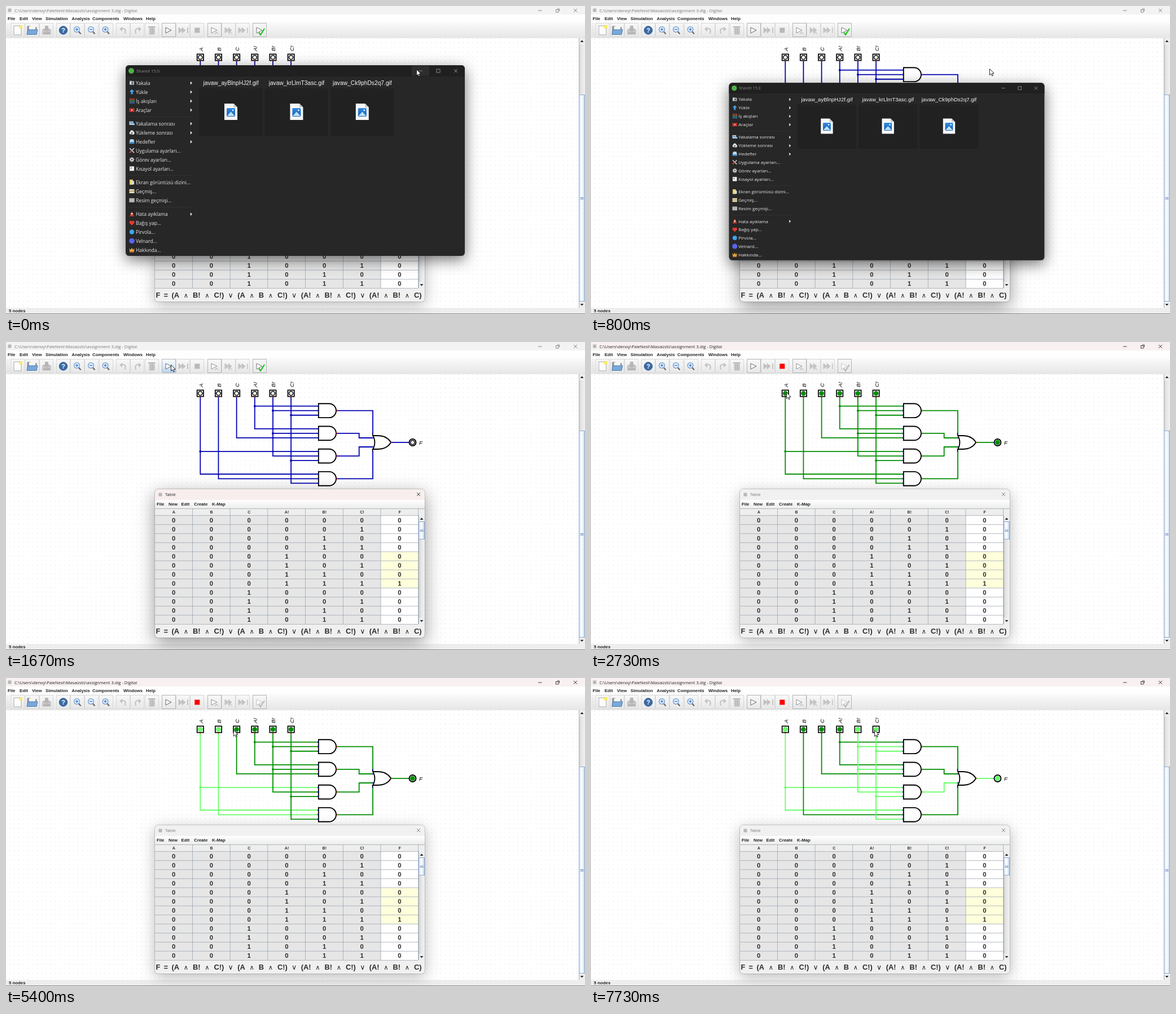
An HTML page with a canvas that plays this animation: 1026x546 px, repeating every 8 s.

```html
<!DOCTYPE html>
<html lang="en">
<head>
<meta charset="utf-8">
<title>Circuit simulation</title>
<style>
html, body { margin: 0; width: 100%; height: 100%; overflow: hidden; background: #fff; }
canvas { display: block; width: 1026px; height: 546px; }
</style>
</head>
<body>
<canvas id="stage" width="1026" height="546"></canvas>
<script>
const c = document.getElementById('stage').getContext('2d');
const LOOP = 8000, TICK = 1000 / 15, U = 8.04;
const UI = '"Open Sans", "Noto Sans", sans-serif';
const ARIAL = '"Liberation Sans", Arial, sans-serif';
const BOLD = 'bold 7.8px ' + ARIAL;
const HIGH = '#66ff66', LOW = '#008e00', WIRE = '#0000b2';
const NAMES = ['A', 'B', 'C', 'A!', 'B!', 'C!'];

// ---- drawing helpers ----
function box(x, y, w, h, fill) { c.fillStyle = fill; c.fillRect(x, y, w, h); }
function frame(x, y, w, h, color) {
  c.strokeStyle = color; c.lineWidth = 1; c.strokeRect(x + .5, y + .5, w - 1, h - 1);
}
function round(x, y, w, h, r, fill) {
  c.beginPath(); c.roundRect(x, y, w, h, r); c.fillStyle = fill; c.fill();
}
function line(pts, color, width = 1) {
  c.beginPath();
  for (let i = 0; i < pts.length; i += 2) c.lineTo(pts[i], pts[i + 1]);
  c.strokeStyle = color; c.lineWidth = width; c.stroke();
}
function poly(pts, fill, stroke, width = 1) {
  c.beginPath();
  for (let i = 0; i < pts.length; i += 2) c.lineTo(pts[i], pts[i + 1]);
  c.closePath();
  if (fill) { c.fillStyle = fill; c.fill(); }
  if (stroke) { c.strokeStyle = stroke; c.lineWidth = width; c.stroke(); }
}
function disc(x, y, r, fill, stroke, width = 1) {
  c.beginPath(); c.arc(x, y, r, 0, 7);
  if (fill) { c.fillStyle = fill; c.fill(); }
  if (stroke) { c.strokeStyle = stroke; c.lineWidth = width; c.stroke(); }
}
function text(s, x, y, font, color = '#222', align = 'left') {
  c.font = font; c.fillStyle = color; c.textAlign = align; c.fillText(s, x, y);
}
function cross(x, y, r, color) {
  line([x - r, y - r, x + r, y + r], color, .9);
  line([x - r, y + r, x + r, y - r], color, .9);
}
function fade(x0, y0, x1, y1, ...colors) {
  const g = c.createLinearGradient(x0, y0, x1, y1);
  colors.forEach((k, i) => g.addColorStop(i / (colors.length - 1), k));
  return g;
}
function shadowed(blur, dy, color, draw) {
  c.save();
  c.shadowBlur = blur; c.shadowOffsetY = dy; c.shadowColor = color;
  draw();
  c.restore();
}

// ---- timeline: time, x, y ----
const PATH = [
  [0, 727, 112], [199, 727, 112], [200, 729, 113], [600, 729, 113], [733, 720, 112], [800, 706, 111],
  [1000, 600, 86], [1200, 430, 50], [1333, 335, 32], [1467, 290, 37], [1667, 292, 40],
  [2133, 292, 40], [2333, 314, 64], [2533, 359, 86], [2733, 346, 89], [3067, 346, 89],
  [3400, 378, 91], [3533, 378, 91], [3867, 414, 93], [4000, 434, 94], [4133, 427, 94],
  [4267, 414, 93], [4400, 411, 92], [5267, 411, 92], [5800, 378, 91], [6133, 378, 91],
  [6467, 392, 93], [6733, 430, 96], [7000, 466, 92], [7133, 471, 92], [7467, 502, 92], [8000, 502, 92]
];
function pointer(t) {
  let i = 1;
  while (i < PATH.length - 1 && PATH[i][0] < t) i++;
  const [t0, x0, y0] = PATH[i - 1], [t1, x1, y1] = PATH[i];
  const k = Math.min(1, (t - t0) / (t1 - t0));
  return [x0 + (x1 - x0) * k, y0 + (y1 - y0) * k];
}
function inputs(t) {
  const on = (a, b = LOOP) => t >= a && t < b;
  return [on(3060), on(3520, 5990), on(4590, 5260), false, on(7120), on(7660)];
}

// ---- main window ----
function appIcon(x, y) { box(x - 3, y - 3, 6, 6, '#b4bab4'); }

function button(x, enabled, hover) {
  box(x, 30, 25, 25, hover ? fade(0, 30, 0, 55, '#ffffff', '#dcebf9', '#b4d2ee')
    : fade(0, 30, 0, 55, '#f8f8f8', '#f0f0f0', '#e6e6e6'));
  frame(x, 30, 25, 25, enabled ? '#b0b6bc' : '#d8d8d8');
}
function lens(x, sign) {
  line([x + 3, 45, x + 7, 49.5], '#666', 2.2);
  disc(x, 41.5, 4.9, '#e4effb', '#6c9bd0', 1.3);
  line([x - 2.4, 41.5, x + 2.4, 41.5], '#3b74b8', 1.3);
  if (sign) line([x, 39.1, x, 43.9], '#3b74b8', 1.3);
}
function play(x, color, n = 1) {
  for (let i = 0; i < n; i++) {
    const l = x - 5 + i * 6;
    poly([l, 38, l, 48, l + (n > 1 ? 6 : 10), 43], n > 1 ? color : '#fff', color, 1);
  }
}
function curl(x, dir) {
  c.beginPath();
  c.moveTo(x - 5 * dir, 41);
  c.quadraticCurveTo(x + 6 * dir, 37, x + 3 * dir, 49);
  c.strokeStyle = '#c4c4c4'; c.lineWidth = 2.2; c.stroke();
  poly([x - 7 * dir, 41, x - 2 * dir, 36.5, x - 2 * dir, 45.5], '#c4c4c4');
}
function toolbar(sim, hover) {
  box(0, 28, 1026, 29, fade(0, 28, 0, 57, '#fcfcfc', '#f0f0f0', '#e6e6e6'));
  for (let y = 31; y < 55; y += 3) for (let x = 2; x < 7; x += 3) box(x, y, 1, 1, '#c4c4c4');
  [276, 357, 437].forEach(x => button(x, true, hover && x === 276));
  [8, 34, 59, 89, 114, 139, 165, 195, 220, 246, 301, 326, 382, 407].forEach(x => button(x, false));

  poly([14, 35, 27, 35, 27, 51, 14, 51], '#fcfcfc', '#aaa');
  disc(26, 37, 3, '#f7e23c'); disc(26, 37, 1.5, '#fff9b0');
  poly([38, 36, 44, 36, 46, 38, 54, 38, 54, 50, 38, 50], '#a0a0a0', '#808080');
  poly([41, 36, 52, 36, 52, 43, 41, 43], '#f6f6f6');
  poly([39, 42, 56, 42, 54, 50.5, 37, 50.5], '#7aa8d8', '#4a7db8');
  round(64, 41, 16, 10, 2, '#c6c6c6');
  poly([69, 35, 75, 35, 75, 40, 78, 40, 72, 46, 66, 40, 69, 40], '#b6b6b6');
  box(66, 47, 12, 2, '#adadad');

  disc(101.5, 43, 7.2, '#3a6ca6', '#2b5488');
  text('?', 101.5, 47, 'bold 11px ' + ARIAL, '#fff', 'center');
  lens(125.5, true); lens(150.5, false); lens(176, true);
  curl(208, 1); curl(233, -1);
  round(253.5, 38, 10, 13, 1.5, '#c8c8c8');
  box(252, 36, 13, 2, '#b8b8b8');
  for (let x = 256; x < 263; x += 3) box(x, 40, 1, 9, '#b0b0b0');

  play(288, '#666');
  play(311, '#c2c2c2', 2); box(321, 38, 2, 10, '#c2c2c2');
  box(334.3, 38.5, 9, 9, sim ? '#ff0000' : '#b8b8b8');
  play(369, '#909090'); line([370, 50, 373, 46, 376, 50], '#aaa', 1);
  play(393, '#c4c4c4', 2); line([395, 50, 398, 46, 401, 50], '#bbb', 1);
  play(417, '#c4c4c4', 2); box(427, 38, 1.5, 10, '#c4c4c4');
  play(449, sim ? '#c0c0c0' : '#777');
  line([448, 47, 451, 51, 458, 40], sim ? '#bababa' : '#19c519', 2.2);
}
function arrow(x, y, dir) {
  poly([x - 3, y + 1.6 * dir, x + 3, y + 1.6 * dir, x, y - 1.8 * dir], '#222');
}
function scrollbar(x, y, h, top, size) {
  box(x, y, 11, h, '#eeeeee');
  box(x, y + 11, 11, h - 22, fade(x, 0, x + 11, 0, '#d2d2d2', '#e8e8e8', '#f0f0f0'));
  box(x, y, 1, h, '#a4aeb8');
  arrow(x + 5.5, y + 5.3, 1);
  arrow(x + 5.5, y + h - 5.5, -1);
  box(x, top, 11, size, fade(x, 0, x + 11, 0, '#cfe0f1', '#ffffff', '#b8cfe5'));
  frame(x, top, 11, size, '#8ea9cf');
  for (let i = -1; i < 2; i++) box(x + 2.5, top + size / 2 + i * 1.5, 6, .7, '#6382bf');
}
function mainWindow(active, sim, hover) {
  const ink = active ? '#222' : '#777';
  box(0, 0, 1026, 546, '#fff');
  box(0, 0, 1026, 15, active ? '#f8f0f1' : '#f3f3f3');
  appIcon(6.5, 7.5);
  text('C:\\Users\\denoy\\PaleNest\\Masaüstü\\assignment 3.dig - Digital', 15, 10.7, '7.6px ' + UI, ink);
  line([943, 8, 949.5, 8], ink, .9);
  c.strokeStyle = ink; c.lineWidth = .8;
  c.strokeRect(974.5, 6.5, 4.5, 4.5);
  line([976.5, 5, 980.5, 5, 980.5, 9], ink, .8);
  cross(1009, 7.8, 3, ink);

  box(0, 15, 1026, 13, '#fefefe');
  const menu = { File: 3, Edit: 24, View: 46, Simulation: 70, Analysis: 116.5, Components: 153, Windows: 208, Help: 248 };
  for (const s in menu) text(s, menu[s], 24.8, BOLD);
  toolbar(sim, hover);

  for (let y = 121.7 - 8 * U; y < 535; y += U)
    for (let x = 344.3 - 42 * U; x < 1014; x += U) box(x - .4, y - .4, .8, .8, '#c0c0c0');

  scrollbar(1015, 57, 478, 157, 367);
  box(0, 535, 1026, 11, '#eeeeee');
  text('5 nodes', 5, 543, BOLD);
  box(0, 545, 1026, 1, '#8a8a8a');
}

// ---- circuit ----
const colX = i => 344.3 + i * 4 * U;
const gateY = i => 121.7 + i * 5 * U;
const GATES = [[3, 4, 5], [3, 4, 2], [0, 4, 5], [0, 1, 5]];
const JOINTS = [[3, 0, 0], [4, 0, 1], [5, 0, 2], [4, 1, 1], [0, 2, 0], [5, 2, 2]];
const pinY = (g, p) => gateY(g) + (p - 1) * U;

function circuit(state, sim) {
  const col = on => sim ? (on ? HIGH : LOW) : WIRE;
  const outs = GATES.map(g => g.every(i => state[i]));
  const result = outs.some(Boolean);
  const W = 1.8;

  NAMES.forEach((name, i) => {
    let end = 97;
    GATES.forEach((g, k) => g.forEach((src, p) => {
      if (src !== i) return;
      const y = pinY(k, p);
      line([colX(i), y, 553, y], col(state[i]), W);
      end = Math.max(end, y);
    }));
    line([colX(i), 97, colX(i), end + W / 2], col(state[i]), W);
  });
  JOINTS.forEach(([i, g, p]) => disc(colX(i), pinY(g, p), 2, col(state[i])));

  line([586, gateY(0), 650, gateY(0), 650, 162], col(outs[0]), W);
  line([586, gateY(1), 625.7, gateY(1), 625.7, 170, 650, 170], col(outs[1]), W);
  line([586, gateY(2), 625.7, gateY(2), 625.7, 186, 650, 186], col(outs[2]), W);
  line([586, gateY(3), 650, gateY(3), 650, 194], col(outs[3]), W);
  line([682, 178, 714, 178], col(result), W);

  NAMES.forEach((name, i) => {
    const x = colX(i);
    box(x - 6.5, 84.5, 13, 13, '#000');
    box(x - 4.8, 86.2, 9.6, 9.6, '#fff');
    if (sim) disc(x, 91, 4.3, col(state[i]));
    else disc(x, 91, 3.6, '#fff', '#000', 1.5);
    disc(x, 97.6, .9, '#c00000');
    c.save();
    c.translate(x + 4.4, 80);
    c.rotate(-Math.PI / 2);
    text(name, 0, 0, 'italic 9.8px ' + ARIAL, '#000');
    c.restore();
  });

  GATES.forEach((g, k) => {
    const y = gateY(k);
    c.beginPath();
    c.moveTo(553.8, y - 12.4);
    c.lineTo(572.6, y - 12.4);
    c.arc(572.6, y, 12.4, -Math.PI / 2, Math.PI / 2);
    c.lineTo(553.8, y + 12.4);
    c.closePath();
    c.fillStyle = '#fff'; c.fill();
    c.strokeStyle = '#000'; c.lineWidth = 1.9; c.stroke();
    for (let p = 0; p < 3; p++) disc(553, pinY(k, p), 1.1, '#0000c0');
    disc(586, y, 1.1, '#c00000');
  });

  c.beginPath();
  c.moveTo(650, 166);
  c.lineTo(658, 166);
  c.bezierCurveTo(670, 166, 678, 171, 682, 178);
  c.bezierCurveTo(678, 185, 670, 190, 658, 190);
  c.lineTo(650, 190);
  c.bezierCurveTo(654.5, 183, 654.5, 173, 650, 166);
  c.fillStyle = '#fff'; c.fill();
  c.strokeStyle = '#000'; c.lineWidth = 1.9; c.stroke();
  line([649.6, 162.5, 650, 166], '#000', 1.9);
  line([650, 190, 649.6, 193.5], '#000', 1.9);
  [162, 170, 186, 194].forEach(y => disc(649.8, y, 1.1, '#0000c0'));
  disc(682.5, 178, 1.1, '#c00000');

  disc(720.5, 178, 6, '#fff', '#000', 1.9);
  if (sim) disc(720.5, 178, 4.4, col(result));
  else disc(720.5, 178, 3.6, '#fff', '#000', 1.5);
  disc(714.4, 178, 1, '#0000c0');
  text('F', 732, 181.5, 'italic 9.8px ' + ARIAL, '#000');
}

// ---- truth table ----
const FORMULA = 'F = (A ∧ B! ∧ C!) ∨ (A ∧ B ∧ C!) ∨ (A! ∧ B! ∧ C!) ∨ (A! ∧ B! ∧ C)';

function table(active) {
  const L = 264, T = 261, W = 478, H = 263, cw = 66.72;
  shadowed(active ? 32 : 26, active ? 9 : 6, active ? 'rgba(0,0,0,.42)' : 'rgba(0,0,0,.28)',
    () => round(L, T, W, H, 6, '#f0f0f0'));
  c.save();
  c.beginPath(); c.roundRect(L, T, W, H, 6); c.clip();
  box(L, T, W, 19, active ? '#f9eeee' : '#f1f1f1');
  appIcon(273.5, 270.5);
  text('Table', 282, 273.3, '7.6px ' + UI, active ? '#222' : '#777');
  cross(731, 270, 3, active ? '#222' : '#777');
  box(L, 280, W, 15, fade(0, 280, 0, 295, '#ffffff', '#ececec'));
  const menu = { File: 267, New: 288, Edit: 310.5, Create: 333, 'K-Map': 365 };
  for (const s in menu) text(s, menu[s], 289.8, BOLD);

  box(L, 295, W, 13, '#eeeeee');
  box(L, 308, cw * 6, 192, '#e6e6e6');
  box(L + cw * 6, 308, cw, 192, '#fff');
  box(L + cw * 6, 372, cw, 64, '#ffffdc');
  const rule = '#98a3ae', thin = .75;
  box(L, 295, W, thin, rule);
  for (let r = 0; r < 13; r++) box(L, 307.3 + r * 16.05, 467, thin, rule);
  for (let k = 1; k < 8; k++) box(L + k * cw - .7, 295, thin, 205, rule);
  [...NAMES, 'F'].forEach((s, k) => text(s, L + (k + .5) * cw, 304.4, 'bold 7.2px ' + ARIAL, '#333', 'center'));
  for (let r = 0; r < 12; r++)
    for (let k = 0; k < 7; k++) {
      const bit = k < 6 ? r >> (5 - k) & 1 : +(r === 7);
      text(bit, L + (k + .5) * cw - .2, 320 + r * 16.03, 'bold 11.3px ' + ARIAL, '#2a2a2a', 'center');
    }
  scrollbar(731, 308, 192, 318, 32);

  let x = 265.5;
  for (const s of FORMULA.split(' ')) {
    if (s === '∧' || s === '∨') {
      text(s, x + 5.7, 517, (s === '∨' ? 12.5 : 11.3) + 'px "DejaVu Sans", sans-serif', '#222', 'center');
      x += 11.4;
    } else {
      text(s, x, 517, 'bold 12.8px ' + ARIAL, '#2a2a2a');
      x += c.measureText(s).width;
    }
    x += 6.3;
  }
  c.restore();
  c.beginPath(); c.roundRect(L - .5, T - .5, W + 1, H + 1, 6);
  c.strokeStyle = 'rgba(110,110,110,.4)'; c.lineWidth = .8; c.stroke();
}

// ---- capture tool window ----
const ITEMS = [
  ['Yakala', 'camera', 1], ['Yükle', 'up', 1], ['İş akışları', 'grid', 1], ['Araçlar', 'case', 1], null,
  ['Yakalama sonrası', 'image', 1], ['Yükleme sonrası', 'cloud', 1], ['Hedefler', 'drive', 1],
  ['Uygulama ayarları...', 'tools'], ['Görev ayarları...', 'gear'], ['Kısayol ayarları...', 'key'], null,
  ['Ekran görüntüsü dizini...', 'folder'], ['Geçmiş...', 'card'], ['Resim geçmişi...', 'list'], null,
  ['Hata ayıklama', 'cone', 1], ['Bağış yap...', 'heart'], ['Pirvola...', 'blue'],
  ['Velnard...', 'violet'], ['Hakkında...', 'crown']
];
const ICONS = {
  camera() { box(-4, -2.5, 8, 6, '#c9d2d8'); box(-4, -3.5, 4, 1, '#9aa'); disc(1, .5, 2, '#53636e'); },
  up() { poly([0, -4.5, 4.3, 0, 1.5, 0, 1.5, 4.5, -1.5, 4.5, -1.5, 0, -4.3, 0], '#4aa3ec'); },
  grid() {
    ['#e64a3c', '#49b35a', '#3d86e0'].forEach((k, r) => {
      for (let i = 0; i < 3; i++) box(-4 + i * 3.2, -4 + r * 3.2, 2.2, 2.2, k);
    });
  },
  case() { box(-4.5, -2.5, 9, 6, '#d8392f'); box(-4.5, 0, 9, 1, '#8e1f19'); box(-1, -.5, 2, 2, '#eee'); },
  image() { box(-4.5, -3.5, 7, 6, '#dfe8ef'); box(-3.5, -2.5, 5, 3, '#5c9bd5'); box(1, 0, 4, 3, '#8fc1ee'); },
  cloud() { disc(-2, 1, 2.4, '#dde3e8'); disc(1.8, 1, 2.8, '#dde3e8'); disc(0, -1.2, 2.8, '#dde3e8'); poly([0, -1, 2, 2, -2, 2], '#555'); },
  drive() { poly([-3, -4, 3, -4, 4.5, 1, -4.5, 1], '#bcd8ee'); box(-4.5, 1, 9, 3, '#4a90cc'); },
  tools() { line([-4, -4, 4, 4], '#c5cbd0', 1.7); line([4, -4, 0, 0], '#c5cbd0', 1.7); line([0, 0, -4, 4], '#d84a3c', 1.9); },
  gear() {
    for (let i = 0; i < 4; i++) {
      const a = i * Math.PI / 4, x = 4.3 * Math.cos(a), y = 4.3 * Math.sin(a);
      line([-x, -y, x, y], '#d4d8da', 1.6);
    }
    disc(0, 0, 2.8, '#d4d8da'); disc(0, 0, 1.2, '#444');
  },
  key() { box(-4, -4, 8, 8, '#f0f0f0'); box(-2.5, -2.5, 2, 3, '#888'); },
  folder() { box(-4, -4.5, 6, 9, '#f0cf6b'); box(-.5, -2, 4.5, 6, '#d5dde2'); },
  card() { box(-4.5, -3.5, 9, 7, '#eadfb8'); box(-4.5, -1, 9, 1.4, '#a07f45'); box(-3.5, -3, 4, 1, '#fff'); },
  list() {
    box(-4.5, -3.5, 9, 7, '#e2e2e2');
    for (let i = 0; i < 6; i++) box(-3.6 + i % 3 * 2.7, -2.5 + (i > 2) * 3, 1.8, 1.8, '#777');
  },
  cone() { poly([0, -4.5, 3, 3, -3, 3], '#e5533d'); box(-1.8, -1, 3.6, 1.5, '#fff'); box(-4, 3, 8, 1.4, '#c63e2b'); },
  heart() { disc(-2, -1.2, 2.5, '#e6392f'); disc(2, -1.2, 2.5, '#e6392f'); poly([-4.3, 0, 4.3, 0, 0, 4.5], '#e6392f'); },
  blue() { disc(0, 0, 4.2, '#3ea6ee'); },
  violet() { disc(0, 0, 4.8, '#5865f2'); },
  crown() { poly([-4.5, -3, -2, 0, 0, -4, 2, 0, 4.5, -3, 3.6, 4, -3.6, 4], '#f2b03d'); box(-3.6, 2, 7.2, 1, '#d5553c'); }
};
const FILES = ['javaw_ayBlnpHJ2f.gif', 'javaw_krLlmT3asc.gif', 'javaw_Ck9phDs2q7.gif'];

function capture(scale, alpha, hover) {
  const d = (1 - scale) / .07;
  c.save();
  c.globalAlpha = alpha;
  c.translate(512.5 + 11.5 * d, 274 + 19.5 * d);
  c.scale(scale, scale);
  c.translate(-512.5, -274);
  shadowed(26, 7, 'rgba(0,0,0,.55)', () => round(212, 105, 601, 338, 6, '#272727'));
  round(212, 105, 601, 20, [6, 6, 0, 0], '#202020');
  if (hover) box(719, 106, 31, 18, '#2d2d2d');
  disc(222, 115, 5, '#4fb04a');
  text('ShareX 15.0', 231, 117.9, '7.5px ' + UI, '#8f8f8f');
  const ink = '#a0a0a0';
  line([731.5, 115, 738, 115], ink, .8);
  c.strokeStyle = ink; c.lineWidth = .8; c.strokeRect(763, 112, 6, 6);
  cross(797, 115, 3, ink);

  let y = 136.5;
  for (const item of ITEMS) {
    if (!item) {
      box(217, y - 4.5, 112, .8, '#343434');
      y += 8;
      continue;
    }
    const [label, icon, sub] = item;
    c.save(); c.translate(223, y - .5); ICONS[icon](); c.restore();
    text(label, 230, y + 3, '8.6px ' + UI, '#e8e8e8');
    if (sub) poly([326.8, y - 3, 329.8, y, 326.8, y + 3], '#f0f0f0');
    y += 16.03;
  }
  FILES.forEach((name, i) => {
    const x = 398.5 + i * 116.4;
    text(name, x, 140, '10.25px ' + ARIAL, '#f4f4f4', 'center');
    round(x - 56, 146, 112, 84.5, 2, '#212121');
    poly([x - 11.5, 173, x + 5, 173, x + 11.5, 179.5, x + 11.5, 202, x - 11.5, 202], '#f7f7f7');
    poly([x + 5, 173, x + 11.5, 179.5, x + 5, 179.5], '#c6c6c6');
    round(x - 7.5, 181, 15, 15, 1.5, fade(0, 181, 0, 196, '#2f8be0', '#1b62b5'));
    poly([x - 7, 195, x, 187.5, x + 7, 195], '#bfe0fa');
    disc(x + 3.5, 184.8, 1.4, '#fff');
  });
  c.restore();
}

function cursor(x, y) {
  c.save();
  c.translate(x + .5, y + .5);
  c.lineJoin = 'round';
  poly([0, 0, 0, 11, 2.5, 8.7, 4.2, 12.4, 5.9, 11.6, 4.3, 8, 7.6, 7.8], '#fff', '#111', .9);
  c.restore();
}

// shrink and opacity of the capture window for each step after the click
const SHRINK = [[.99, 1], [.965, 1], [.93, 1], [.83, .75], [.68, .3]];

function draw(t) {
  const started = t >= 1925, main = t >= 1860;
  const [x, y] = pointer(t);
  mainWindow(main, started, t >= 1525 && t < 2260);
  circuit(inputs(t), started);
  table(t >= 660 && !main);
  const step = Math.round(t / TICK) - 10;
  if (step < 0) capture(1, 1, true);
  else if (step < SHRINK.length) capture(...SHRINK[step], step === 0);
  cursor(x, y);
}

let last = -1;
function loop() {
  const n = Math.floor((performance.now() % LOOP + 5) / TICK) % 120;
  if (n !== last) { last = n; draw(n * TICK); }
  requestAnimationFrame(loop);
}
loop();
</script>
</body>
</html>
```
